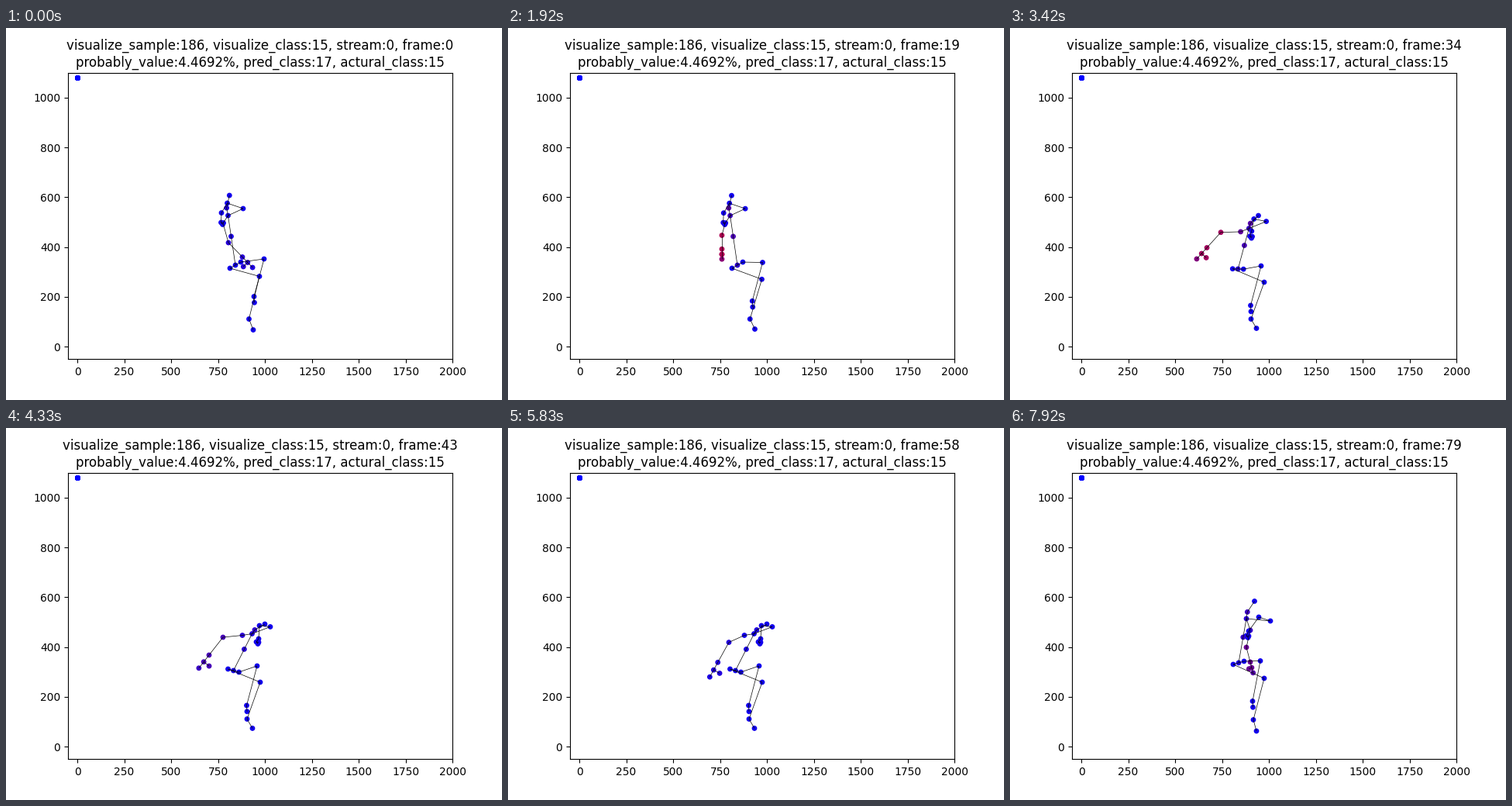
These frames come from a looping animation (640 px wide and 480 px high, 8 s). A matplotlib script:

```python
import numpy as np
import matplotlib.pyplot as plt
from matplotlib.animation import FuncAnimation
from matplotlib.collections import LineCollection

LOOP, TICK = 8000, 20

# Stage positions of the leading joints: standing, bent over, risen.
# The "1" side reaches out, the "2" side rests.
POSES = {
    "base": [(296, 306), (293.5, 313), (295, 303)],
    "chest": [(286.5, 242), (317.5, 265.5), (305, 246)],
    "head": [(288.3, 216), (334, 253), (315.5, 223.5)],
    "shoulder1": [(280, 252), (305, 267.5), (310, 261)],
    "shoulder2": [(306, 233), (341, 256.5), (336, 249)],
    "elbow2": [(285.5, 226), (327, 255), (321, 244)],
    "wrist2": [(278, 238.5), (326, 272), (308, 262)],
    "hand2": [(277.5, 251), (323, 276), (305, 268)],
    "hip1": [(289, 310), (286.5, 311), (288, 305)],
    "knee1": [(327, 320.5), (328, 328), (328, 323)],
    "ankle1": [(313.5, 375.5), (311, 375.5), (314, 376.5)],
    "foot1": [(319, 389.5), (318, 387.5), (318, 391)],
    "knee2": [(333, 298), (324, 307), (323, 300.5)],
    "ankle2": [(320, 346.5), (310.5, 358), (313, 352.5)],
}
# The reaching arm swings through these points
SWING = (12, 26, 43, 67, 79)
ELBOW = [(287, 277), (265, 258), (280, 270), (288, 280.5), (305, 283)]
WRIST = [(305, 295.5), (247, 275), (262, 293), (276, 308), (310, 302)]

CHAINS = [
    "base spine chest neck head",
    "chest shoulder1 elbow1 wrist1 hand1 tip1", "hand1 thumb1",
    "chest shoulder2 elbow2 wrist2 hand2 tip2", "hand2 thumb2",
    "base hip1 knee1 ankle1 foot1",
    "base hip2 knee2 ankle2 foot2",
]
BONES = [pair for c in CHAINS for pair in zip(c.split(), c.split()[1:])]
ARM = {"shoulder1": .6, "elbow1": 1, "wrist1": 1, "hand1": 1, "tip1": .8, "thumb1": 1}
TORSO = {"base": .6, "spine": 1, "chest": .8, "neck": 1.2}


def ease(n, a, b):
    u = np.clip((n - a) / (b - a), 0, 1)
    return u * u * (3 - 2 * u)


def swing(n, points):
    return np.array([np.interp(n, SWING, c) for c in zip(*points)])


def skeleton(n):
    """Stage position of every joint at step n."""
    rise = ease(n, 62, 79)
    j = {}
    for name, pose in POSES.items():
        stand, bent, up = np.array(pose, float)
        is_leg = name[:-1] in ("knee", "ankle", "foot")
        bend = ease(n, 12, 26) if is_leg else ease(n, 18, 43)
        j[name] = stand + (bent - stand) * bend + (up - bent) * rise

    j["spine"] = j["base"] + .58 * (j["chest"] - j["base"])
    j["neck"] = j["chest"] + .36 * (j["head"] - j["chest"]) + (-2.5, -.5)
    j["hip2"] = 2 * j["base"] - j["hip1"]
    j["foot2"] = j["ankle2"] + (.5, 7.8)
    j["tip2"] = j["hand2"] + (2, 2.5)
    j["thumb2"] = j["hand2"] + (3, .5)

    j["elbow1"], j["wrist1"] = swing(n, ELBOW), swing(n, WRIST)
    fore = j["wrist1"] - j["elbow1"]
    j["hand1"] = j["wrist1"] + .38 * fore
    j["tip1"] = j["hand1"] + .35 * fore
    # the thumb sticks out square to the forearm and hangs down
    side = np.clip(fore[0] / 8, -1, 1)
    j["thumb1"] = j["hand1"] + .3 * np.array([-side * fore[1], abs(fore[0])])
    return j


def colours(n, names):
    """Blue joints glow red as the arm reaches out."""
    bump = np.exp(-((n - 26) / 13.5) ** 2)
    rise = ease(n, 62, 79)
    arm = .13 + .72 * bump + .28 * rise
    torso = .1 + .25 * bump + .1 * rise
    heat = [ARM[k] * arm if k in ARM else max(.07, TORSO.get(k, 0) * torso)
            for k in names]
    return [(v, 0, 1 - v) for v in heat]


def to_data(p):
    return ((p[0] - 80) / 496 * 2050 - 50, 1100 - (p[1] - 57.6) / 369.6 * 1150)


def step_at(k):
    """Ten steps a second, shown on a clock of twelve ticks a second."""
    tick = int((k * TICK + TICK / 2 + 4) * 12 / 1000)
    return (5 * tick + 2) // 6


fig, ax = plt.subplots(figsize=(6.4, 4.8), dpi=100)
ax.set_xlim(-50, 2000)
ax.set_ylim(-50, 1100)
title = ax.set_title("")
ax.scatter([0] * 25, [1080] * 25, s=15, color="blue")
dots = ax.scatter([], [], s=15)
bones = ax.add_collection(
    LineCollection([], colors="k", linewidths=.5, zorder=2), autolim=False)


def update(k):
    n = step_at(k)
    joints = {name: to_data(p) for name, p in skeleton(n).items()}
    dots.set_offsets(list(joints.values()))
    dots.set_color(colours(n, joints))
    bones.set_segments([(joints[a], joints[b]) for a, b in BONES])
    title.set_text(
        f"visualize_sample:186, visualize_class:15, stream:0, frame:{n}\n"
        "probably_value:4.4692%, pred_class:17, actural_class:15")
    return dots, bones, title


anim = FuncAnimation(fig, update, frames=LOOP // TICK, interval=TICK,
                     repeat=True, repeat_delay=0)
plt.show()
```
